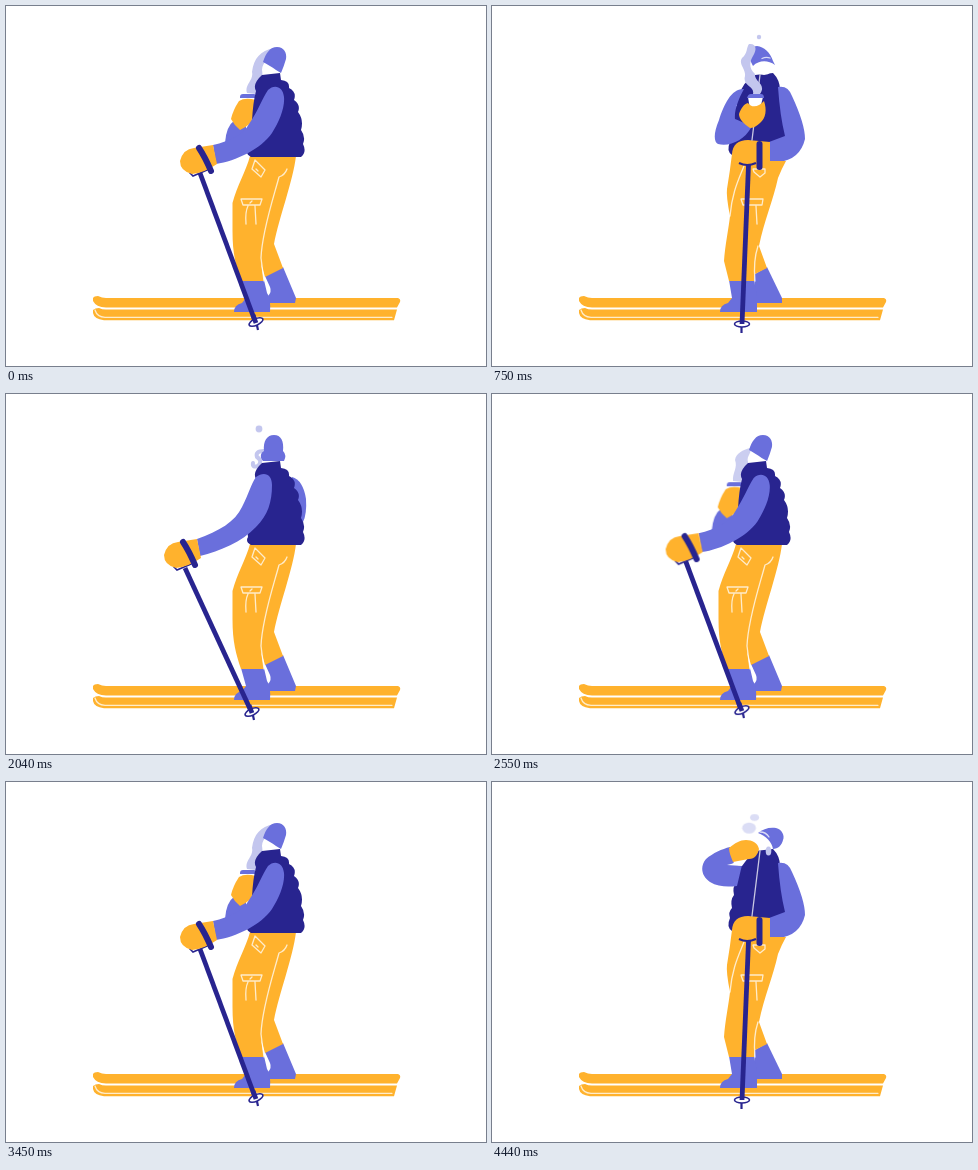
These frames come from a looping animation (480x360 px, 4.5 s). An HTML page without scripts:

```html
<!DOCTYPE html>
<html lang="en">
<head>
<meta charset="utf-8">
<title>Skier with a hot drink</title>
<style>
html, body { margin: 0; width: 100%; height: 100%; overflow: hidden; background: #fff; }
svg { display: block; width: 100vw; height: 100vh; }
.o { fill: #ffb22d; }
.n { fill: #28248f; }
.p { fill: #6a6fdc; }
.w { fill: #fff; }
.s { fill: #c3c6ee; }
.line { fill: none; stroke: #fff; stroke-opacity: .75; stroke-width: 1.3; stroke-linejoin: round; stroke-linecap: round; }
.pole { fill: none; stroke: #28248f; stroke-width: 4.8; }
.fine { stroke-width: 2.2; }
.strap { fill: none; stroke: #28248f; stroke-width: 6; stroke-linecap: round; }
.thin { fill: #fff; stroke: #28248f; stroke-width: 1.6; }

/* --a / --b: shapes at each end of a move, --t: offset at its start, --u: at its end */
* { --t: none; --u: none; }
.back, .front, .turn, .lift, .sip, .waft, .drift, .bead, .puff, .ring, .curl {
  animation: 4.5s linear infinite;
}
.back { animation-name: back; animation-timing-function: step-end; }
.front { animation-name: front; animation-timing-function: step-end; }
.turn { animation-name: turn; animation-timing-function: ease-in-out; }
.lift { animation-name: lift; animation-timing-function: ease-in-out; }
.waft { animation-name: waft; animation-timing-function: ease-in-out; }
.sip { animation-name: sip; }
.drift { animation-name: drift; }
.bead { animation-name: bead; }
.ring { animation-name: ring; }
.curl { animation-name: curl; }
.puff { animation-name: puff; transform-box: fill-box; transform-origin: center; }

@keyframes back {
  0%, 40.7% { visibility: visible; }
  8%, 77.3%, 100% { visibility: hidden; }
}
@keyframes front {
  0%, 40.7% { visibility: hidden; }
  8%, 77.3%, 100% { visibility: visible; }
}
@keyframes turn {
  0%, 8%, 58%, 100% { d: var(--b); transform: var(--u); }
  40%, 46% { d: var(--a); transform: var(--t); }
}
@keyframes lift {
  0%, 20%, 77%, 88.5% { d: var(--a); transform: var(--t); }
  29%, 41%, 97.5%, 100% { d: var(--b); transform: var(--u); }
}
@keyframes sip {
  0%, 26%, 77%, 94.5% { opacity: 0; }
  28.5%, 41%, 97%, 100% { opacity: 1; }
}
@keyframes waft {
  0%, 8%, 72%, 100% { d: var(--b); opacity: 1; }
  40%, 53% { d: var(--a); opacity: 0; }
  58%, 66% { d: var(--a); opacity: 1; }
}
@keyframes drift {
  0%, 8%, 77.3%, 85.4% { d: var(--a); opacity: 1; }
  16.7%, 20% { d: var(--b); opacity: 1; }
  24%, 41%, 92.5%, 100% { d: var(--b); opacity: 0; }
}
@keyframes bead {
  0%, 8%, 77.3% { transform: translateY(19px); opacity: 1; }
  16.7% { transform: none; opacity: 1; }
  20%, 41%, 91%, 100% { transform: translateY(-4px); opacity: 0; }
  85.4% { transform: translateY(4px); opacity: 1; }
}
@keyframes puff {
  0%, 27.5%, 77%, 95% { transform: translate(3px, 12px) scale(1.2); opacity: 0; }
  30% { transform: translate(2px, 7px) scale(1.2); opacity: .7; }
  33.3% { transform: none; opacity: 1; }
  39%, 41% { transform: translateY(-6px) scale(.6); opacity: 0; }
  98.7%, 100% { transform: translate(0, 4px) scale(1.25); opacity: .6; }
}
@keyframes ring {
  0%, 8%, 51%, 100% { transform: translateY(-7px); opacity: 0; }
  40%, 41% { transform: translateY(6px); opacity: 1; }
  45.3% { transform: none; opacity: 1; }
}
@keyframes curl {
  0%, 8%, 54%, 100% { transform: translateY(-8px); opacity: 0; }
  40%, 48% { transform: none; opacity: 1; }
}
</style>
</head>
<body>
<svg viewBox="0 0 480 360">
  <g id="skis">
    <path class="o" d="M87 292Q88 290 92 290Q96 292 100 292H392Q395 293 394 296L391 301.500H100Q90 301 87 295Z"/>
    <path class="o" d="M87 304Q89 302 93 302Q96 303.500 100 303.500H391L388 314.300H98Q88 313 87 307Z"/>
    <path class="line" d="M89 304Q91 311 99 311.300H386"/>
  </g>

  <g class="back">
    <path class="p" d="M259 270L277 261L290 292L289 297H263L262 290Q266 286 264 281Z"/>
    <path class="p" d="M235 274H258L261 287Q265 292 264 306H228Q228 299 236 297L240 292Z"/>
    <path class="o" d="M244 150H290C287 175 273 212 268 238L277 262L259 271L255 257L258 275H235C230 260 226.500 248 226.500 225V197C231 180 240 165 244 150Z"/>
    <g class="line">
      <path d="M281 163Q279 169 273 171C268 190 256 225 255 252L258 275"/>
      <path d="M249 154L259 164L255 171L246 163ZM250 163L252 165"/>
      <path d="M235 193H256L254 199H237ZM244 197L246 195M242 200Q239 206 240 218M249 200L250 218"/>
    </g>

    <path class="s waft" style="--a:path('M241 87C240 79 246 74 243 66C244 59 251 56 258 54C261 58 254 62 256 68C258 75 248 80 250 88Z');--b:path('M241 87C238 79 248 74 246 66C248 52 254 45 268 42C266 50 256 56 256 64C258 75 252 80 250 88Z')"/>
    <path class="curl" fill="none" stroke="#c3c6ee" stroke-width="4" stroke-linecap="round" d="M258 57Q249 57 251 63Q257 67 252 72Q246 74 247 69"/>
    <circle class="s ring" cx="253" cy="35" r="3.400"/>

    <g class="turn" style="--t:translate(0,0);--u:translate(-14px,0)">
      <path class="p" d="M286 83Q297 86 300 105Q301 120 297 128L286 120Z"/>
    </g>
    <g class="turn" style="--t:translate(30px,8px);--u:translate(0,0)">
      <path class="p" d="M229 114Q220 120 219 137L240 130V116Z"/>
      <path class="w" d="M236 91H249L248 97H237Z"/>
      <path class="o" d="M233 95Q239 91 250 94Q253 101 252 108Q245 119 234 124Q228 119 225 113Q227 104 233 95Z"/>
      <path class="p" d="M234 91Q234 88 237 88H248Q250 88 250 92H234Z"/>
    </g>

    <path class="p turn" style="--a:path('M257 67C254 64 254 59 258 57C257 47 261 41 268 41C275 41 278 47 277 57Q281 61 278 67Z');--b:path('M270 64C266 61 261 58 257 56C260 47 264 41 271 41C278 41 281 47 280 53Q278 60 275 67Z')"/>
    <path class="n" d="M256 69L274 67L275 74Q284 75 283 82Q291 86 288 94Q295 99 292 106Q298 114 295 124Q300 131 297 138Q301 146 295 151H245Q239 148 242 143Q240 130 246 115Q247 96 250 85Q246 78 256 69Z"/>

    <path class="pole turn" style="--a:path('M179 174L245 317');--b:path('M194 167L249 315')"/>
    <g class="turn" style="--t:translate(-4px,2px);--u:translate(0,0)">
      <path class="pole fine" d="M250 315L252 324"/>
      <ellipse class="thin" cx="250" cy="316" rx="7.500" ry="3.200" transform="rotate(-25 250 316)"/>
      <path class="pole" d="M247 309L250 317"/>
    </g>
    <path class="p turn" style="--a:path('M250 83C258 77 266 80 266 91C266 108 262 121 250 133C236 148 214 157 194 162L191 145C213 137 229 128 236 113C243 99 245 90 250 83Z');--b:path('M262 84C268 78 277 80 278 91C279 102 273 116 266 127C255 143 230 155 210 158L207 139C224 135 237 129 243 118C252 105 256 93 262 84Z')"/>
    <g class="turn" style="--t:translate(-16px,6px);--u:translate(0,0)">
      <path class="thin" d="M184 167L187 170L201 164L200 160Z"/>
      <path class="o" d="M207 139L211 158Q198 167 186 168Q174 165 174 155Q177 143 188 142Z"/>
      <path class="strap" d="M193 142Q199 151 205 165"/>
    </g>
  </g>

  <g class="front">
    <path class="p" d="M263 268L275 261L290 292V297H265L262 286Z"/>
    <path class="p" d="M237 274H262L265 290V306H228Q228 299 236 297L240 292Z"/>
    <path class="n" d="M263 69L281 67Q288 74 288 84L294 131L278 137L256 135Q244 137 240 149Q234 145 238 136Q236 130 240 126Q238 118 242 113Q240 105 245 99Q244 92 248 88Q250 77 263 69Z"/>
    <path class="p" d="M286 81Q296 79 300 90Q313 118 313 133Q308 154 286 156H277V136L293 130Q288 110 286 81Z"/>
    <path class="o" d="M240 148Q241 134 256 134L278 136V155L294 155Q290 162 286 172C281 195 272 215 267 240L275 262L263 268L262 275H237L232 255C233 240 237 220 238 210Q234 190 235 183Q238 165 240 148Z"/>
    <g class="line">
      <path d="M268 69L260 134"/>
      <path d="M252 160C246 175 240 187 238 210M266 240Q261 255 263 275"/>
      <path d="M249 193H271L270 199H251ZM264 200L265 218"/>
      <path d="M261 163H273V167L268 171L262 166Z"/>
    </g>
    <path class="strap" d="M267.500 138V161"/>
    <path class="pole fine" d="M249.500 317V327"/>
    <ellipse class="thin" cx="250" cy="318" rx="7.500" ry="3"/>
    <path class="pole" d="M256.500 159L250 318"/>
    <path class="pole fine" d="M247 157Q255 161 264 157"/>

    <g class="lift" style="--t:translate(0,0);--u:translate(-1px,-3px)">
      <ellipse class="w" cx="272" cy="60" rx="10" ry="9"/>
    </g>
    <path class="p lift" style="--a:path('M258 54C256 44 260 40 265 40C272 41 278 46 281 55L283 59C276 54 267 54 261 60Z');--b:path('M266 51C271 47 277 45 284 46C290 47 293 54 291 58C290 63 286 67 281 67C280 60 274 54 266 51Z')"/>
    <path class="line lift" style="--a:path('M270 52.500Q274 50.500 278 52');--b:path('M268 50Q274 50 277 55')"/>
    <ellipse class="s sip" cx="276.500" cy="69" rx="2.800" ry="4.500"/>

    <path class="s drift" style="--a:path('M268 88C274 78 260 74 262 66C256 60 258 52 262 46C260 39 257 39 254 44C256 50 246 52 248 60C250 66 254 66 253 72C252 80 262 80 260 88Z');--b:path('M268 88C275 78 262 76 263 68C256 62 258 55 261 50C266 42 263 37 257 38C254 42 256 47 250 52C246 58 254 63 253 70C250 80 263 80 261 88Z')"/>
    <circle class="s bead" cx="267" cy="31" r="2.200"/>

    <path class="p lift" style="--a:path('M252 83C240 82 232 98 227 114C221 128 222 136 226 138C238 141 252 134 259 122C256 118 248 115 243 113C242 104 247 92 252 83Z');--b:path('M245 104C236 105 226 105 218 100C209 94 208 84 214 77C221 71 230 67 238 65C239 70 241 75 242 79C240 82 246 84 250 83Z')"/>
    <path class="w sip" d="M235 83Q246 81 248 75L256 76L250 84Z"/>
    <g class="lift" style="--t:translate(0,0);--u:translate(-8px,-27px)">
      <path class="w" d="M256 91H271L268 103H258Z"/>
      <path class="p" d="M255 92Q256 88 259 88H269Q272 88 272 92Z"/>
    </g>
    <path class="o lift" style="--a:path('M258 122C251 117 247 113 247 108C249 102 252 98 256 97C260 103 268 100 272 95C275 104 274 112 268 117C265 120 261 122 258 122Z');--b:path('M241 80C239 75 237 70 237 66C243 61 248 58 254 58C260 58 266 61 267 67C266 72 263 77 257 77C251 78 246 79 241 80Z')"/>
    <ellipse class="s puff" cx="257" cy="42" rx="5.500" ry="4.400"/>
    <ellipse class="s puff" cx="262.500" cy="31.500" rx="3.600" ry="2.700"/>
  </g>
</svg>
</body>
</html>
```
